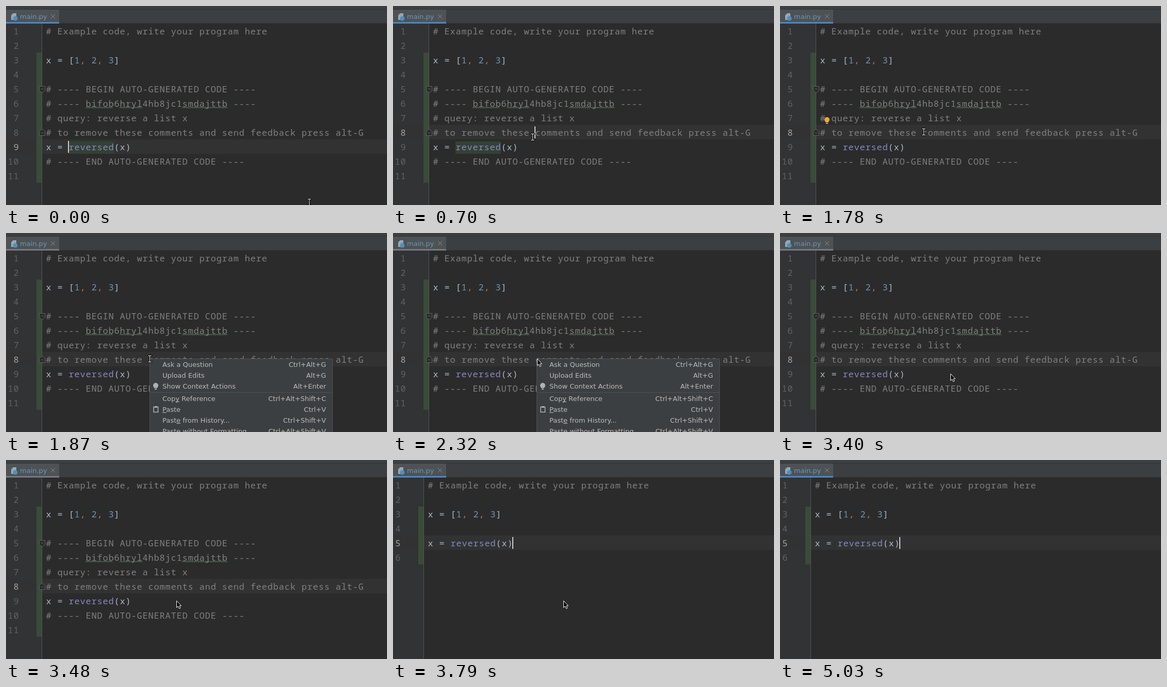
Write an HTML page with a canvas that moves like this. It is 738x385 px and loops after 5190 ms.

```html
<!DOCTYPE html>
<html lang="en">
<head>
<meta charset="utf-8">
<title>Editor</title>
<style>
html, body { margin: 0; width: 738px; height: 385px; overflow: hidden; background: #2b2b2b; }
canvas { display: block; }
</style>
</head>
<body>
<canvas id="stage" width="738" height="385"></canvas>
<script>
const c = document.getElementById('stage').getContext('2d');
const LOOP = 5190, STEP = 75, COL = 11, ROW = 28, ITEM = 21;
const MONO = '17px "Noto Sans Mono", monospace';
const UI = '13px "DejaVu Sans", sans-serif';

const before = [
  '# Example code, write your program here',
  '',
  'x = [1, 2, 3]',
  '',
  '# ---- BEGIN AUTO-GENERATED CODE ----',
  '# ---- bifob6hryl4hb8jc1smdajttb ----',
  '# query: reverse a list x',
  '# to remove these comments and send feedback press alt-G',
  'x = reversed(x)',
  '# ---- END AUTO-GENERATED CODE ----',
  ''
];
const after = [...before.slice(0, 4), before[8], ''];

// an underscore precedes the underlined letter, '-' is a separator
const menu = [
  ['Ask a Question', 'Ctrl+Alt+G'],
  ['Upload Edits', 'Alt+G'],
  ['Show Context Actions', 'Alt+Enter'],
  ['-'],
  ['Cop_y Reference', 'Ctrl+Alt+Shift+C'],
  ['_Paste', 'Ctrl+V'],
  ['Past_e from History...', 'Ctrl+Shift+V'],
  ['Paste without Formatting', 'Ctrl+Alt+Shift+V']
];

// pointer moves, each from wherever the last one ended
const home = { x: 587, y: 379 };
const glides = [
  { at: 70, steps: 7, x: 270, y: 253 },
  { at: 940, steps: 3, x: 268, y: 243 },
  { at: 1630, steps: 1, x: 278, y: 243 },
  { at: 2020, steps: 1, x: 278, y: 242 },
  { at: 2320, steps: 7, x: 330, y: 270 },
  { at: 2860, steps: 1, x: 330, y: 272 },
  { at: 4480, steps: 4, x: 590, y: 400 }
];

const during = (t, a, b) => t >= a && t < b;
const ease = p => p * p * p * (p * (6 * p - 15) + 10);

function pointerAt(t) {
  let { x, y } = home;
  for (const g of glides) {
    if (t < g.at) break;
    const p = ease(Math.min(1, (Math.floor((t - g.at) / STEP) + 1) / g.steps));
    x += (g.x - x) * p;
    y += (g.y - y) * p;
  }
  return { x: Math.round(x), y: Math.round(y) };
}

function box(color, x, y, w, h) {
  c.fillStyle = color;
  c.fillRect(x, y, w, h);
}

function shape(path, fill, stroke, width = 1) {
  const p = new Path2D(path);
  c.fillStyle = fill;
  c.strokeStyle = stroke;
  c.lineWidth = width;
  if (fill) c.fill(p);
  if (stroke) c.stroke(p);
}

function disc(color, x, y, r) {
  c.fillStyle = color;
  c.beginPath();
  c.arc(x, y, r, 0, 7);
  c.fill();
}

function text(font, color, str, x, y) {
  c.font = font;
  c.letterSpacing = font === MONO ? '0.8px' : '0px';
  c.fillStyle = color;
  c.fillText(str, x, y);
}

function bulb(color, x, y) {
  disc(color, x, y, 5);
  box(color, x - 3, y + 3, 6, 2);
  box('#afb1b3', x - 2, y + 6, 4, 2);
}

function tabBar(focused) {
  box('#3c3f41', 0, 0, 738, 34);
  box('#323232', 0, 6, 738, 1);
  box('#323232', 0, 33, 738, 1);
  box('#4e5254', 0, 7, 103, 27);
  box(focused ? '#4a88c7' : '#747a80', 0, 31, 103, 3);
  shape('M14 14h6v13h-10v-9z', '#9aa7b0');
  disc('#4a90c2', 18, 24, 4.5);
  text(UI, '#6897bb', 'main.py', 27, 25);
  shape('M87 16l8 8m0-8l-8 8', null, '#85898c');
}

function codeLine(str, x, y, plain) {
  if (str[0] === '#') return text(MONO, '#808080', str, x, y);
  for (const part of str.split(/(reversed|\d|,)/)) {
    const color = part === 'reversed' && !plain ? '#8888c6'
      : part === ',' ? '#cc7832'
      : /^\d$/.test(part) ? '#6897bb' : '#a9b7c6';
    text(MONO, color, part, x, y);
    x += part.length * COL;
  }
}

// wavy line below each longer run of letters in the generated id
function squiggles(str, x, y) {
  const id = str.match(/\w+/);
  for (const word of id[0].matchAll(/[a-z]{4,}/g)) {
    const from = x + (id.index + word.index) * COL;
    const waves = Math.floor(word[0].length * COL / 4);
    shape(`M${from} ${y}` + 'l2 -2l2 2'.repeat(waves), null, '#659c6b');
  }
}

// dir 1 points down, -1 points up
function fold(y, dir) {
  c.save();
  c.translate(64.5, y);
  c.scale(1, dir);
  shape('M0 -6h11v8l-5.5 4.5l-5.5 -4.5z', '#2b2b2b', '#606366');
  shape('M3 -1h5', null, '#606366');
  c.restore();
}

function editor(t) {
  const done = t >= 3560;
  const lines = done ? after : before;
  const x = done ? 67 : 77;
  const current = done ? 5 : t < 630 ? 9 : 8;
  const column = done ? 15 : t < 630 ? 4 : 18;
  const top = current * ROW + 6;
  const textX = x + .4;

  box('#2b2b2b', 0, 34, 738, 351);
  box('#313335', 0, 34, x - 8, 351);
  box('#323232', 0, top, 738, ROW);
  box('#384c38', x - 18, 90, 10, (lines.length - 2) * ROW);
  box('#555555', x - 8, 34, 1, 351);
  if (t < 940) box('#344134', x + 4 * COL, 262, 8 * COL, 24);

  lines.forEach((str, i) => {
    const n = String(i + 1), y = (i + 1) * ROW + 27;
    text(MONO, i + 1 === current ? '#a4a3a3' : '#606366', n, textX - 52 - n.length * COL, y);
    codeLine(str, textX, y, done && t < 3790);
  });

  if (!done) {
    squiggles(lines[5], x, 197.5);
    fold(161.5, 1);
    fold(244.5, -1);
  }
  if (t < 310 || during(t, 630, 1090) || during(t, 3560, 4560) || t >= 5030)
    box('#cccccc', x - 1 + column * COL, top + 3, 2, 23);
  if (during(t, 1470, 1870)) bulb('#f0a732', 91, 220);
}

function popup(pointerY) {
  box('#515151', 278, 243, 355, 142);
  box('#3c3f41', 279, 244, 353, 141);
  let y = 244;
  for (const [label, keys] of menu) {
    if (label === '-') {
      box('#515151', 279, y + 1, 353, 1);
      y += 3;
      continue;
    }
    if (during(pointerY, y, y + ITEM)) box('#2f65ca', 279, y, 353, ITEM);
    const base = y + 15;
    const [head, tail] = label.split('_');
    text(UI, '#bbbbbb', head + (tail ?? ''), 303, base);
    if (tail)
      box('#bbbbbb', 303 + c.measureText(head).width, base + 1, c.measureText(tail[0]).width, 1);
    c.textAlign = 'right';
    text(UI, '#bbbbbb', keys, 620, base);
    c.textAlign = 'left';
    y += ITEM;
  }
  bulb('#afb1b3', 290, 295);
  shape('M286 336.5h8.5v10h-8.5z', null, '#afb1b3', 1.5);
  box('#afb1b3', 288, 335, 5, 3);
}

function pointer({ x, y }, arrow) {
  c.save();
  c.translate(x + .5, y + .5);
  if (arrow) {
    shape('M0 0v13l3 -2.7l2 4.7l2.3 -1l-2 -4.5h3.7z', '#000', '#fff');
  } else {
    const beam = 'M-3 -6h6m-3 0v12m-3 0h6';
    c.lineCap = 'square';
    shape(beam, null, '#000', 3);
    shape(beam, null, '#fff', 1);
  }
  c.restore();
}

function draw(t) {
  const mouse = pointerAt(t);
  editor(t);
  tabBar(!during(t, 1870, 3560));
  if (during(t, 1870, 3400)) popup(mouse.y);
  pointer(mouse, during(t, 2020, 4480));
}

const start = performance.now();
function tick() {
  draw((performance.now() - start) % LOOP);
  requestAnimationFrame(tick);
}
tick();
</script>
</body>
</html>
```
